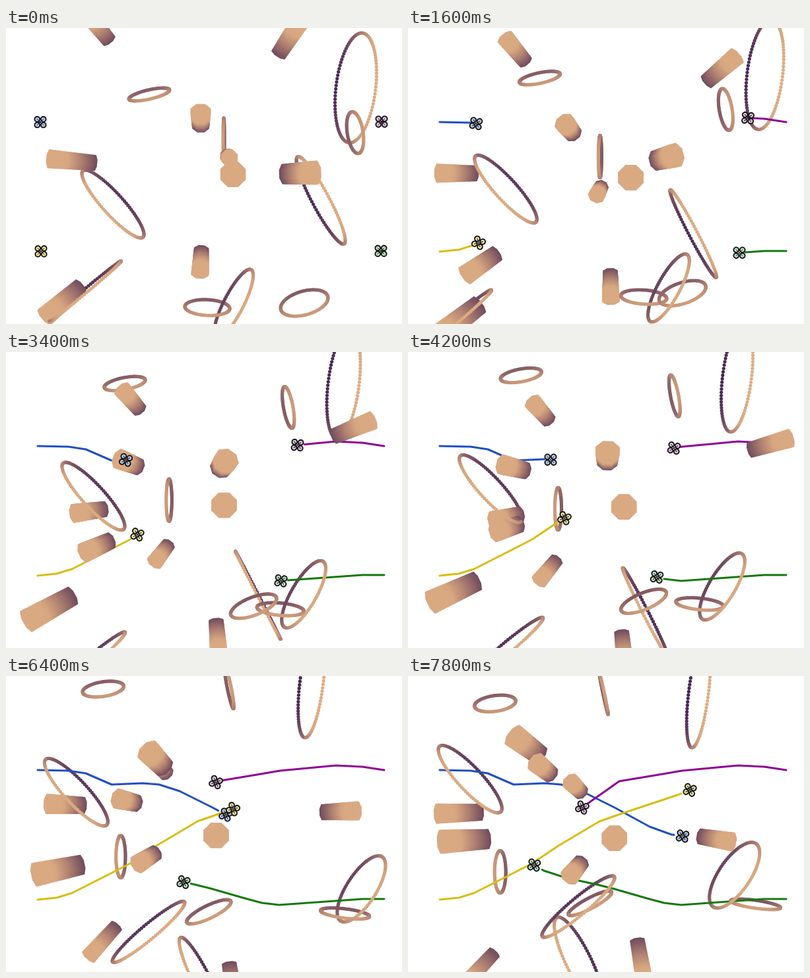
These frames come from a looping animation (600x450 px, 8 s). An HTML page with a canvas:

```html
<!DOCTYPE html>
<html lang="en">
<head>
<meta charset="utf-8">
<title>Drones among moving obstacles</title>
<style>
html, body { margin: 0; width: 100%; height: 100%; overflow: hidden; background: #fff; }
canvas { display: block; }
</style>
</head>
<body>
<canvas id="stage" width="600" height="450"></canvas>
<script>
const ctx = document.getElementById('stage').getContext('2d');
const STEP = 200, LOOP = 8000, LAST = 7.8, TRAIL_LAG = 0.22;

// Axis motion: [start, speed per second, time of bounce].
// Rings: a and b are semi-axes, angle in degrees; lists run evenly over the loop.
const rings = [
  { x: [217, -10.9], y: [101, -15.6, 5.8], a: [31.5], b: [7, 12], angle: [-13, -8] },
  { x: [530, 16.2, 1.13], y: [91, -12.6, 6.5], a: [84], b: [30, 15], angle: [277] },
  { x: [529, -29.8], y: [159, -22, 6.9], a: [32], b: [12, 1], angle: [261, 258] },
  { x: [162, -8.7], y: [267.5, -14.2], a: [68], b: [16, 18], angle: [48, 47], over: true },
  { x: [477, -28], y: [262, 31.7, 6.62], a: [75], b: [13, -19], angle: [242, 244] },
  { x: [305, 32.6, 7.3], y: [425, -10], a: [34, 38], b: [12, 6], angle: [3, 8], over: true },
  { x: [452, -22.6], y: [418, -9.3], a: [37], b: [18, 8], angle: [-16, -28], over: true },
  { x: [120, 30, 1.6].map((v, i) => i === 1 ? -v : v), y: [400, 27.5, 3], a: [71], b: [3, 13], angle: [-40], over: true },
  { x: [345, 31.2, 6.3], y: [419, -14.9], a: [58], b: [15, 24], angle: [-63, -56], over: true },
  { x: [330, -24.4], y: [169, 16.5], a: [32], b: [1, 8.5], angle: [90] }
];

// Tubes: (hx, hy) points from the middle to the near, light end.
const tubes = [
  { x: [139, 14.8], y: [-2, 21.9], hx: [-17, -8], hy: [-21, -8], r: 14 },
  { x: [295, -32, 7.3], y: [138, 9], hx: [0, -33], hy: [-11, 1], r: 16 },
  { x: [100, -29, 1.25], y: [202, 11.8], hx: [-34, -9], hy: [-3, 11], r: 15 },
  { x: [445, -34], y: [221, -14.8], hx: [24, -20], hy: [-1, -15], r: 19 },
  { x: [86, 15.3], y: [416, -35.3], hx: [-27, -11], hy: [23, -9], r: 16 },
  { x: [81, -4.4, 3.4], y: [498, -31.8], hx: [-33, -35], hy: [32, 2], r: 19 },
  { x: [295, 7.5], y: [355, 23.4, 5.65], hx: [-1, 6], hy: [18, 35], r: 14 },
  { x: [430, 28.3, 4.55], y: [14, 30], hx: [17, 31, 24], hy: [-26, -10, 4], r: 15 },
  { x: [337, -29.8], y: [196, 32.4], hx: [2, -26], hy: [2, 28], r: 13 },
  { x: [344, -4], y: [222.5, 3.1], hx: [0], hy: [0], r: 20 }
];

// Drones follow their path; x and turn are given at the times in `marks`.
const marks = [0, 1.6, 2.6, 4.2, 5, 6.4, 7.8];
const drones = [
  { color: '#1f4fc4', tint: '#b4c8ee',
    x: [52, 103, 147, 216, 260, 333, 416], turn: [0, 0.2, 0.6, 0, 0.2, 0.4, 0.2],
    path: [[48, 143], [95, 144], [121, 148], [160, 165], [207, 163], [232, 165], [263, 175], [313, 200], [366, 229], [399, 241], [420, 244]] },
  { color: '#8f0596', tint: '#dfbfe3',
    x: [569, 515, 480, 403, 359, 318, 264], turn: [0, 0.1, 0, 0.2, 0.2, 0.4, 0.4],
    path: [[573, 143], [540, 138], [500, 136], [415, 144], [380, 150], [320, 160], [272, 194], [260, 203]] },
  { color: '#d8bd10', tint: '#eee49f',
    x: [53, 107, 161, 237, 269, 344, 427], turn: [0, 0.5, 0.2, 0.4, 0.3, 0.5, 0.3],
    path: [[48, 340], [77, 337], [100, 330], [155, 302], [188, 285], [228, 258], [290, 221], [327, 208], [411, 180], [430, 172]] },
  { color: '#137a0c', tint: '#bfe0c5',
    x: [568, 502, 456, 377, 339, 269, 191], turn: [0, 0, 0.1, 0.2, 0.3, 0.3, 0.2],
    path: [[573, 339], [540, 339], [414, 348], [388, 345], [362, 338], [310, 323], [286, 317], [240, 307], [206, 296], [185, 284]] }
];

const ramp = [[64, 36, 82], [118, 80, 96], [172, 126, 112], [214, 166, 128], [222, 174, 132]];

const mix = (a, b, u) => a + (b - a) * u;
const clamp = (v, lo, hi) => Math.min(hi, Math.max(lo, v));
const travel = ([start, speed, bounce = Infinity], t) =>
  start + speed * (t < bounce ? t : 2 * bounce - t);

function along(list, u) {
  const p = clamp(u, 0, 1) * (list.length - 1), i = Math.floor(p);
  return mix(list[i], list[Math.min(i + 1, list.length - 1)], p - i);
}

function atMark(list, t) {
  let i = 0;
  while (i < marks.length - 2 && t > marks[i + 1]) i++;
  return mix(list[i], list[i + 1], clamp((t - marks[i]) / (marks[i + 1] - marks[i]), 0, 1));
}

function shade(depth) {
  const u = (depth + 85) / 170;
  return `rgb(${[0, 1, 2].map(c => Math.round(along(ramp.map(k => k[c]), u)))})`;
}

// A ring is a tilted circle of dots; its near half is lighter than its far half.
function drawRing(ring, t, front) {
  const u = t / LAST;
  const a = along(ring.a, u), b = along(ring.b, u);
  const angle = along(ring.angle, u) * Math.PI / 180;
  const cos = Math.cos(angle), sin = Math.sin(angle);
  const x = travel(ring.x, t), y = travel(ring.y, t);
  const depth = Math.sqrt(a * a - b * b), count = 100;
  for (let i = 0; i < count; i++) {
    const phi = i / count * 2 * Math.PI;
    const p = a * Math.cos(phi), q = b * Math.sin(phi);
    if ((phi < Math.PI) !== front) continue;
    ctx.fillStyle = shade(depth * Math.sin(phi));
    ctx.beginPath();
    ctx.arc(x + p * cos - q * sin, y + p * sin + q * cos, 2.6, 0, 7);
    ctx.fill();
  }
}

// A tube is a stack of octagons from the far, dark end to the near, light one.
function drawTube(tube, t) {
  const hx = along(tube.hx, t / LAST), hy = along(tube.hy, t / LAST);
  const half = Math.hypot(hx, hy), squash = Math.max(0.35, 1 - half / 45);
  const slices = 24;
  ctx.save();
  ctx.translate(travel(tube.x, t), travel(tube.y, t));
  ctx.rotate(Math.atan2(hy, hx));
  for (let i = 0; i <= slices; i++) {
    const s = i / slices, r = tube.r * mix(0.87, 1.04, s);
    ctx.fillStyle = shade(-45 + 105 * Math.min(1, s * 1.35));
    ctx.beginPath();
    for (let k = 0; k < 8; k++) {
      const phi = (k + 0.5) * Math.PI / 4;
      ctx.lineTo(mix(-half, half, s) + r * squash * Math.cos(phi), r * Math.sin(phi));
    }
    ctx.fill();
  }
  ctx.restore();
}

function pathY(path, x) {
  const dir = Math.sign(path[1][0] - path[0][0]);
  let i = 0;
  while (i < path.length - 2 && (path[i + 1][0] - x) * dir < 0) i++;
  const [x0, y0] = path[i], [x1, y1] = path[i + 1];
  return mix(y0, y1, (x - x0) / (x1 - x0));
}

function drawTrail({ path, x, color }, t) {
  const end = atMark(x, t - TRAIL_LAG), dir = Math.sign(path[1][0] - path[0][0]);
  ctx.strokeStyle = color;
  ctx.lineWidth = 3;
  ctx.lineCap = ctx.lineJoin = 'round';
  ctx.beginPath();
  for (const p of path) if ((end - p[0]) * dir > 0) ctx.lineTo(...p);
  ctx.lineTo(end, pathY(path, end));
  ctx.stroke();
}

function drawDrone({ path, x, turn, tint }, t) {
  const px = atMark(x, t);
  ctx.save();
  ctx.translate(px, pathY(path, px));
  ctx.rotate(atMark(turn, t));
  ctx.strokeStyle = '#111';
  ctx.fillStyle = tint;
  for (const [sx, sy] of [[-1, -1], [1, -1], [1, 1], [-1, 1]]) {
    ctx.lineWidth = 1.9;
    ctx.beginPath();
    ctx.arc(sx * 4.7, sy * 4.4, 3.9, 0, 7);
    ctx.fill();
    ctx.stroke();
    ctx.lineWidth = 1;
    ctx.beginPath();
    ctx.moveTo(0, 0);
    ctx.lineTo(sx * 5, sy * 4.7);
    ctx.stroke();
  }
  ctx.restore();
}

function draw(t) {
  ctx.fillStyle = '#fff';
  ctx.fillRect(0, 0, 600, 450);
  for (const ring of rings) {
    drawRing(ring, t, false);
    if (!ring.over) drawRing(ring, t, true);
  }
  for (const drone of drones) drawTrail(drone, t);
  for (const tube of tubes) drawTube(tube, t);
  for (const ring of rings) if (ring.over) drawRing(ring, t, true);
  for (const drone of drones) drawDrone(drone, t);
}

let shown = -1;
function tick() {
  const step = Math.floor(performance.now() % LOOP / STEP);
  if (step !== shown) draw(step * STEP / 1000);
  shown = step;
  requestAnimationFrame(tick);
}
tick();
</script>
</body>
</html>
```
